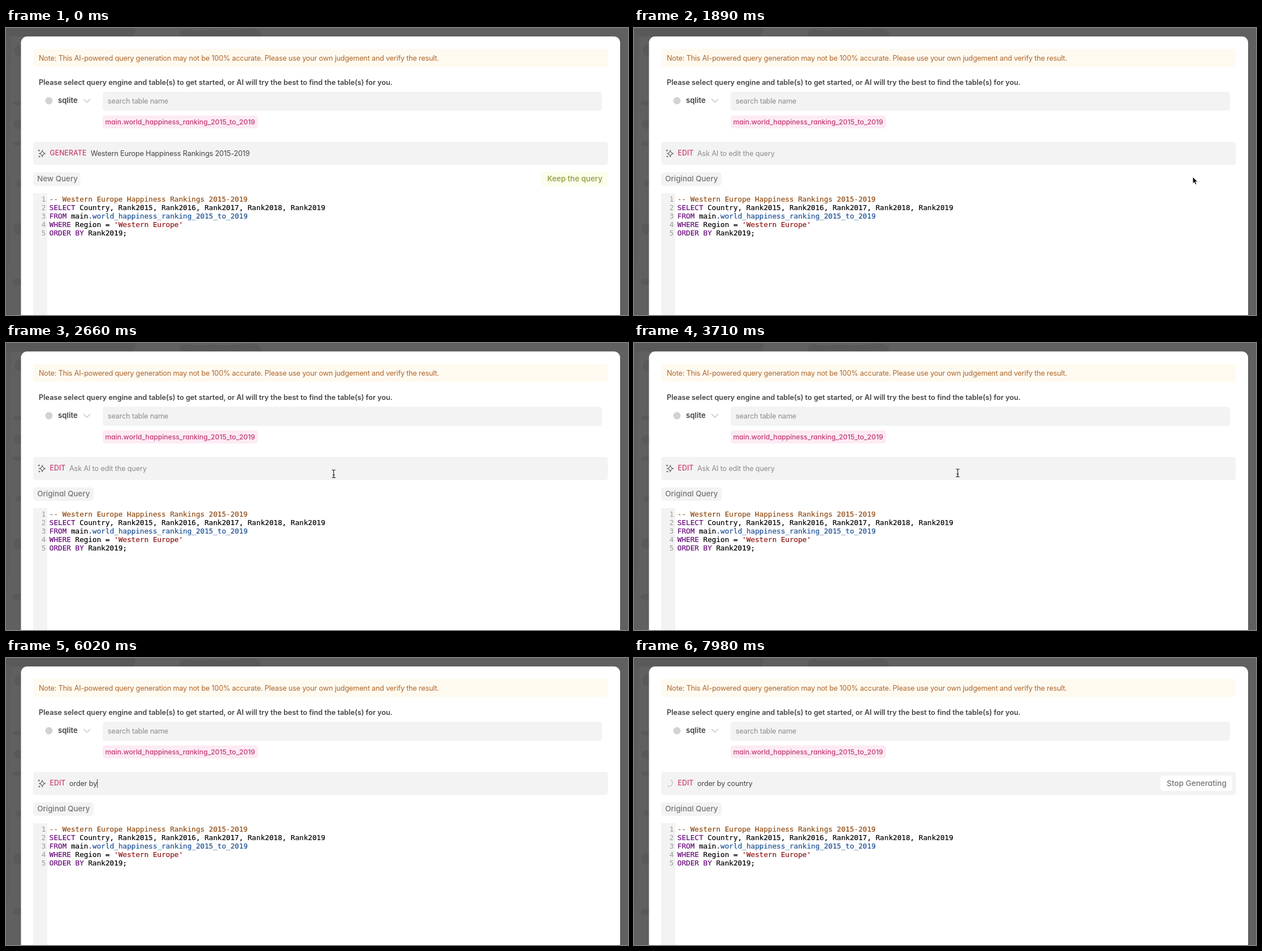
Recreate the animation shown at these times as an HTML page. Size 1101 by 509 pixels, loop 8 s.

```html
<!DOCTYPE html>
<html lang="en">
<head>
<meta charset="utf-8">
<title>AI query editor</title>
<style>
  html, body { margin: 0; width: 100%; height: 100%; overflow: hidden; background: #606060; }
  svg { display: block; width: 1101px; height: 509px; }
  text { white-space: pre; font: 12.7px Inter, "Open Sans", sans-serif; letter-spacing: -0.19px; fill: #444; }
  .bold { font-weight: 600; letter-spacing: 0; }
  .prompt { letter-spacing: -0.14px; }
  .ui { font-size: 13.4px; font-weight: 450; letter-spacing: 0; font-feature-settings: "cv11"; }
  .engine { font-size: 13.2px; font-weight: 600; }
  .label { font-size: 12.4px; font-weight: 500; fill: #c83f72; }
  .tag { font-size: 12.15px; font-weight: 500; fill: #bf3a74; }
  .hint { fill: #8c8c8c; }
  .muted { fill: #747474; }
  .code { font: 12.68px "DejaVu Sans Mono", "Liberation Mono", monospace; letter-spacing: 0; }
  .code, .code tspan { fill: currentColor; stroke: currentColor; stroke-width: .2px; }
  .number { color: #999; text-anchor: end; stroke: none; }
  .comment { color: #8f4a10; }
  .keyword { color: #660a78; }
  .table { color: #1a4f94; }
  .string { color: #8f1414; }
</style>
</head>
<body>
<svg viewBox="0 0 1101 509">
  <rect width="1101" height="509" fill="#606060"/>
  <g fill="#595959">
    <path d="M0 0H228Q231 8 224 15H0Z"/>
    <path d="M308 15Q304 4 318 2Q340 7 362 3Q400 6 425 1Q450 -1 452 12L450 15Z"/>
    <path d="M0 15H10Q5 70 7 120Q2 230 6 330Q9 390 2 440L0 509Z" fill="#5c5c5c"/>
    <ellipse cx="23" cy="40" rx="8" ry="10"/>
    <ellipse cx="21" cy="133" rx="9" ry="4"/>
    <ellipse cx="22" cy="171" rx="8" ry="8"/>
    <ellipse cx="21" cy="205" rx="8" ry="4"/>
    <ellipse cx="23" cy="276" rx="5" ry="6"/>
    <ellipse cx="22" cy="356" rx="9" ry="10"/>
    <ellipse cx="21" cy="450" rx="9" ry="6"/>
  </g>
  <rect x="26.5" y="15" width="1060.5" height="520" rx="11" fill="#fff"/>

  <rect x="48" y="37" width="1017.5" height="32" rx="5" fill="#fffaf0"/>
  <text x="58" y="57.5" style="fill:#ad662c">Note: This AI-powered query generation may not be 100% accurate. Please use your own judgement and verify the result.</text>
  <text x="58" y="101.3" class="bold">Please select query engine and table(s) to get started, or AI will try the best to find the table(s) for you.</text>

  <circle cx="76" cy="129" r="6.5" fill="#d2d2d2"/>
  <text x="92" y="133.4" class="ui engine">sqlite</text>
  <path d="M137.5 126l5.7 6 5.7-6" fill="none" stroke="#bdbdbd" stroke-width="1.2"/>
  <rect x="171" y="113" width="884" height="34" rx="5" fill="#f3f3f3"/>
  <text x="180" y="134.2" class="hint">search table name</text>
  <rect x="171" y="155" width="275" height="23" rx="5" fill="#fdebf4"/>
  <text x="175.5" y="170.8" class="ui tag">main.world_happiness_ranking_2015_to_2019</text>

  <rect x="48" y="202" width="1017.5" height="41" rx="5" fill="#f3f3f3"/>
  <g id="sparkle" fill="none" stroke="#666" stroke-width="1.1" stroke-linejoin="round">
    <path d="M64.2 216.6Q65 221.8 69.8 222.6Q65 223.4 64.2 228.6Q63.4 223.4 58.6 222.6Q63.4 221.8 64.2 216.6Z"/>
    <path d="M58.4 215.4v3.6M56.6 217.2h3.6M59 226.4v3M57.5 227.9h3"/>
  </g>
  <path id="spinner" d="M65 216.3A6 6 0 0 1 59.8 227.1" fill="none" stroke="#bcbcbc" stroke-width="1.2" stroke-linecap="round"/>
  <text id="mode" x="77.5" y="226.4" class="ui label"></text>
  <text id="prompt" y="227.2"></text>
  <rect id="caret" y="215" width="1" height="15" fill="#333"/>
  <g id="stop">
    <rect x="932" y="208.5" width="127" height="27" rx="5" fill="#fff"/>
    <text x="943" y="226.5" class="ui muted" style="font-size:13.6px">Stop Generating</text>
  </g>

  <rect id="titleBox" x="48" y="256" height="24" rx="5" fill="#f3f3f3"/>
  <text id="title" x="55.3" y="272.4" class="ui muted"></text>
  <g id="keep">
    <rect id="keepBox" x="947" y="255" width="118.5" height="26" rx="5"/>
    <text x="958" y="272.4" class="ui" style="fill:#8b9c3c">Keep the query</text>
  </g>

  <rect x="48" y="293" width="25" height="216" fill="#f3f3f3"/>
  <g id="code"></g>

  <g id="beam" fill="none" stroke-linecap="round">
    <path d="M-3 -7Q0 -7 0 -5Q0 -7 3 -7M0 -5V5M-3 7Q0 7 0 5Q0 7 3 7M-1.5 1.8h3" stroke="#fff" stroke-width="2.6"/>
    <path d="M-3 -7Q0 -7 0 -5Q0 -7 3 -7M0 -5V5M-3 7Q0 7 0 5Q0 7 3 7M-1.5 1.8h3" stroke="#222" stroke-width="1.2"/>
  </g>
  <path id="arrow" d="M0 0V12.2L2.8 9.6L4.7 14L6.9 13.1L5 8.8H8.8Z" fill="#111" stroke="#fff" stroke-width=".9"/>
  <path id="hand" d="M-1.2 1Q0 -.6 1.2 1V6Q2.6 4.8 3.5 6.4Q5 5.5 5.8 7.1Q7.6 6.6 7.8 8.3V11Q7.6 13 6.4 15H-.4Q-2 12.5 -4.2 9.4Q-4.1 7.7 -2.4 8.4L-1.2 9.6Z" fill="#fff" stroke="#222" stroke-width="1"/>
</svg>
<script>
const LOOP = 8000, STEP = 70;
const CLICK_KEEP = 1890, FOCUS = 3220, BLINK_OFF = 3710, TYPE_START = 3920, SUBMIT = 7280;
const $ = id => document.getElementById(id);
const show = (id, visible) => $(id).setAttribute('display', visible ? 'inline' : 'none');

// Each row: text, then its highlight class
const lines = [
  [['-- Western Europe Happiness Rankings 2015-2019', 'comment']],
  [['SELECT', 'keyword'], [' Country, Rank2015, Rank2016, Rank2017, Rank2018, Rank2019']],
  [['FROM', 'keyword'], [' main'], ['.world_happiness_ranking_2015_to_2019', 'table']],
  [['WHERE', 'keyword'], [' Region = '], ["'Western Europe'", 'string']],
  [['ORDER BY', 'keyword'], [' Rank2019;']]
];
$('code').innerHTML = lines.map((parts, i) => {
  const y = 308.2 + i * 15;
  const spans = parts.map(([text, kind = '']) => `<tspan class="${kind}">${text}</tspan>`).join('');
  return `<text x="70.5" y="${y}" class="code number">${i + 1}</text><text x="76.8" y="${y}" class="code">${spans}</text>`;
}).join('');

const typing = [
  [3920, 'o'], [4130, 'or'], [4550, 'ore'], [4900, 'or'], [5040, 'ord'], [5180, 'orde'],
  [5250, 'order'], [5320, 'order '], [5740, 'order b'], [5880, 'order by'], [6370, 'order by '],
  [6440, 'order by c'], [6510, 'order by co'], [6650, 'order by cou'], [6720, 'order by coun'],
  [6790, 'order by count'], [6860, 'order by countr'], [6930, 'order by country']
];

// Pointer stops: time, x, y
const path = [
  [70, 1010, 490], [350, 905, 377], [630, 905, 377], [910, 901, 304], [980, 957, 296],
  [1120, 957, 296], [1260, 989, 264], [2030, 989, 264], [2660, 580, 232], [2800, 573, 230.5]
];

const ease = u => u * u * (3 - 2 * u);

function pointerAt(t) {
  const next = path.findIndex(stop => stop[0] > t);
  if (next < 0) return path[path.length - 1].slice(1);
  const [t0, x0, y0] = path[next - 1], [t1, x1, y1] = path[next];
  const u = ease((t - t0) / (t1 - t0));
  return [x0 + (x1 - x0) * u, y0 + (y1 - y0) * u];
}

function drawPointer(t) {
  let shape = '';
  if (t >= path[0][0] && t < TYPE_START) {
    const [x, y] = pointerAt(t);
    const overKeep = x > 947 && y > 255 && y < 281;
    if (overKeep && t < CLICK_KEEP) shape = 'hand';
    else if (y > 293 || y < 243) shape = 'beam';
    else shape = 'arrow';
    $(shape).setAttribute('transform', `translate(${x} ${y})`);
  }
  for (const id of ['beam', 'arrow', 'hand']) show(id, id === shape);
  $('keepBox').setAttribute('fill', shape === 'hand' ? '#f9fadc' : '#fdfdec');
}

function drawPrompt(t) {
  const editing = t >= CLICK_KEEP, typed = t >= TYPE_START;
  const entry = typing.filter(([at]) => at <= t).pop();
  const left = editing ? 112 : 150;
  const prompt = $('prompt');
  $('mode').textContent = editing ? 'EDIT' : 'GENERATE';
  prompt.textContent = typed ? entry[1]
    : editing ? 'Ask AI to edit the query' : 'Western Europe Happiness Rankings 2015-2019';
  prompt.setAttribute('x', left);
  prompt.setAttribute('class', editing && !typed ? 'prompt hint' : 'prompt');
  show('caret', t >= FOCUS && t < BLINK_OFF || typed && t < SUBMIT);
  $('caret').setAttribute('x', left + (typed ? prompt.getComputedTextLength() : 0));
}

function render(time) {
  const t = Math.floor(time / STEP) * STEP;
  const editing = t >= CLICK_KEEP, loading = t >= SUBMIT;
  drawPrompt(t);
  $('title').textContent = editing ? 'Original Query' : 'New Query';
  $('titleBox').setAttribute('width', editing ? 107 : 83.5);
  show('keep', !editing);
  show('sparkle', !loading);
  show('spinner', loading);
  show('stop', loading);
  $('spinner').setAttribute('transform', `rotate(${(t - 7980) * 0.36} 63 222)`);
  drawPointer(t);
}

const start = performance.now();
function tick() {
  render((performance.now() - start) % LOOP);
  requestAnimationFrame(tick);
}
tick();
</script>
</body>
</html>
```
